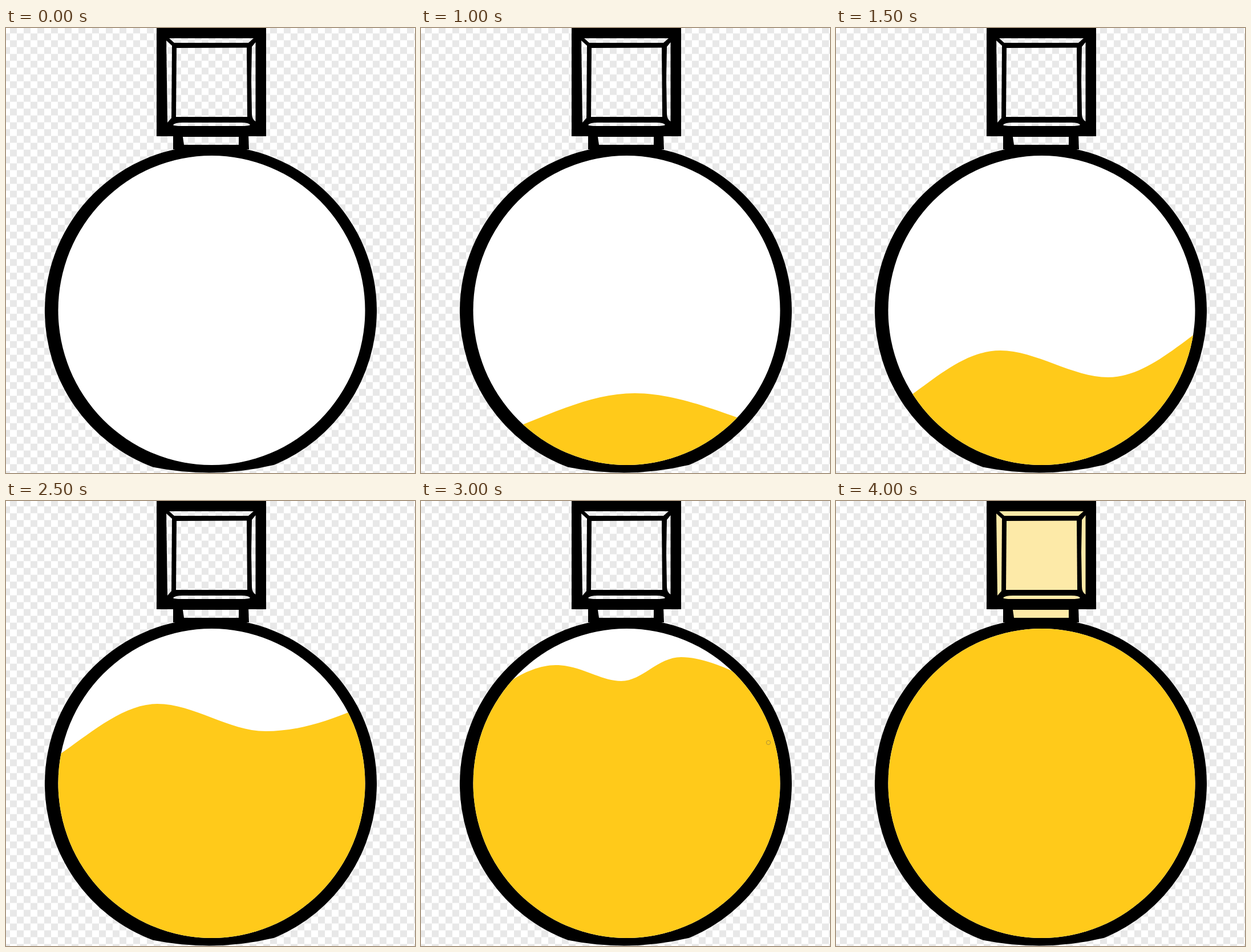
These frames come from a looping animation (717 by 781 pixels, 4500 ms). An HTML page:

```html
<!DOCTYPE html>
<html lang="en">
<head>
<meta charset="utf-8">
<title>Filling bottle</title>
<style>
  html, body { margin: 0; width: 100%; height: 100%; overflow: hidden; background: #fff; }
  svg { display: block; width: 717px; height: 781px; }
</style>
</head>
<body>
<svg viewBox="0 0 717 781">
  <defs>
    <pattern id="checker" x="-5" y="-2.5" width="24" height="24" patternUnits="userSpaceOnUse">
      <rect width="24" height="24" fill="#fff"/>
      <path d="M12 0h12v12h-12zM0 12h12v12H0z" fill="#e8e8e8"/>
    </pattern>
    <clipPath id="bowl"><ellipse cx="360.5" cy="495.5" rx="269" ry="271.5"/></clipPath>
  </defs>

  <rect width="717" height="781" fill="url(#checker)"/>

  <!-- Silhouette: cap, neck and round body with a flattened base -->
  <path d="M264 0H456V190H425L426 213H293V190H264Z"/>
  <path d="M68 496A291 290 0 0 1 650 496A291 293 0 0 1 470 766.8Q365 792 258 770.8A291 293 0 0 1 68 496Z"/>

  <g id="cap" fill="url(#checker)">
    <path d="M299 35L422 34.5L423 156H298Z"/>
    <path d="M286 18H434L425 26H295Z"/>
    <path d="M281 22L291 31L290 158L283 166Z"/>
    <path d="M437.5 25V164Q431 160 431 150L430 90L431 33Z"/>
    <path d="M293 170Q296 166 310 166H412Q426 166 428 170Q426 172 412 172H308Q294 172 293 170Z"/>
    <path d="M310 191H408V205H312Z"/>
  </g>

  <g clip-path="url(#bowl)">
    <rect y="200" width="717" height="581" fill="#fff"/>
    <path id="liquid" fill="#ffca1a"/>
  </g>
  <circle cx="588.5" cy="348" r="1.2"/>
  <circle id="ring" r="3.6" fill="none" stroke="#a58a3c" stroke-width=".9"/>
</svg>

<script>
  const STEP = 500;
  const FULL = 'M80 200H640';

  // Liquid surface per step, from rim to rim; everything below it is filled.
  const steps = [
    { surface: '' },
    { surface: 'M198 718C235 695 258 680 283 680C338 680 370 733 430 733C465 733 495 722 527 709' },
    { surface: 'M176 697C240 672 305 641 375 641C435 641 500 664 558 685' },
    { surface: 'M132 644C180 610 230 566 288 566C350 566 415 613 477 613C530 613 578 575 629 537' },
    { surface: 'M88 531C185 492 285 450 377 450C450 450 545 482 634 508', ring: [179, 581] },
    { surface: 'M92 446C145 410 205 356 265 356C330 356 390 404 455 404C510 404 560 388 612 366' },
    { surface: 'M156 317C180 300 210 288 236 288C280 288 315 316 351 316C388 316 415 274 456 274C485 274 520 286 553 302', ring: [609, 424] },
    { surface: FULL },
    { surface: FULL, cap: '#fdeaa8' }
  ];

  const [cap, liquid, ring] = ['cap', 'liquid', 'ring'].map(id => document.getElementById(id));

  function fillBelow(surface) {
    const [, startY] = surface.match(/\d+/g);
    return `${surface}H717V781H0V${startY}Z`;
  }

  function draw({ surface, ring: spot, cap: capColor = 'url(#checker)' }) {
    liquid.setAttribute('d', surface && fillBelow(surface));
    cap.setAttribute('fill', capColor);
    ring.setAttribute('visibility', spot ? 'visible' : 'hidden');
    if (spot) {
      ring.setAttribute('cx', spot[0]);
      ring.setAttribute('cy', spot[1]);
    }
  }

  function tick() {
    draw(steps[Math.floor(performance.now() / STEP) % steps.length]);
    requestAnimationFrame(tick);
  }
  tick();
</script>
</body>
</html>
```
